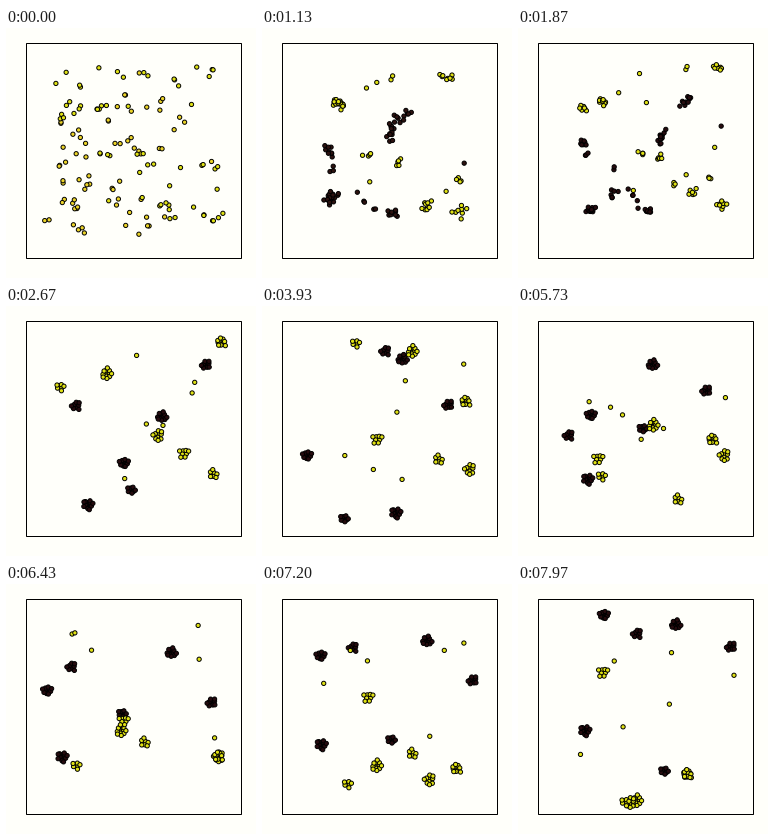
Animation of 250 by 250 pixels, one loop 8 s. Source, as a matplotlib script:

```python
import numpy as np
import matplotlib.pyplot as plt
from matplotlib.animation import FuncAnimation
from matplotlib.patches import Rectangle

SIZE, FRAMES, LOOP = 250, 240, 8000
KEYS = np.array([0, 34, 80, 118, 151, 193, 239])
SPOTS, STRAYS = 90, 6
LOW, HIGH = np.array([23, 18]), np.array([232, 227])
DARK = np.array([38, 11, 14]) / 255
GOLD = np.array([236, 212, 40]) / 255
LIME = np.array([224, 226, 20]) / 255
rng = np.random.default_rng(5)

# Waypoints of each flock, largest flock first.
DARK_ROUTES = [
    [(82, 199), (134, 207), (88, 176), (56, 173), (67, 147)],
    [(156, 111), (140, 53), (111, 49), (166, 69), (158, 41)],
    [(118, 157), (45, 149), (97, 111), (41, 106), (86, 31)],
    [(200, 59), (186, 99), (175, 57), (206, 119), (213, 63)],
    [(70, 100), (123, 46), (50, 155), (66, 82), (119, 50)],
    [(125, 184), (82, 212), (128, 130), (116, 130), (146, 187)],
]
LIME_ROUTES = [
    [(101, 68), (151, 46), (153, 94), (115, 148), (119, 217)],
    [(152, 129), (208, 163), (196, 135), (212, 173), (112, 218)],
    [(215, 36), (203, 96), (179, 100), (212, 173), (169, 190)],
    [(178, 147), (114, 133), (53, 160), (118, 136), (85, 88)],
    [(207, 168), (176, 154), (180, 218), (138, 158), (169, 190)],
    [(54, 81), (94, 38), (97, 149), (70, 182), (107, 218)],
]


def disc(n, spread):
    """Evenly packed offsets in a slightly uneven disc."""
    k = np.arange(n) + 0.5
    a = 2.39996 * k + rng.uniform(0, 2 * np.pi)
    pts = spread * np.sqrt(k)[:, None] * np.c_[np.cos(a), np.sin(a)]
    return pts + rng.normal(0, 0.4, (n, 2))


def flocks(routes, largest, spread):
    paths = [np.array(route, float)[:, None] + disc(largest - i, spread)
             for i, route in enumerate(routes)]
    return np.concatenate(paths, axis=1)


def match(src, dst):
    """Reorder src by swaps so that each point lies close to its dst."""
    cost = ((src[:, None] - dst[None]) ** 2).sum(-1)
    idx = np.arange(len(src))
    order = idx.copy()
    for _ in range(20):
        for i in idx:
            gain = (cost[order[i], i] + cost[order, idx]
                    - cost[order, i] - cost[order[i], idx])
            j = gain.argmax()
            order[i], order[j] = order[j], order[i]
    return src[order]


def gather(pts, radius=15, rounds=4):
    """Draw points of one kind towards their neighbours."""
    for _ in range(rounds):
        d2 = ((pts[:, None] - pts[None]) ** 2).sum(-1)
        w = np.exp(-d2 / (2 * radius**2))
        pts = w @ pts / w.sum(1, keepdims=True)
    return pts + rng.normal(0, 3.2, pts.shape)


def build():
    dark = flocks(DARK_ROUTES, 14, 1.4)
    lime = flocks(LIME_ROUTES, 12, 1.6)
    strays = rng.uniform((60, 40), (220, 180), (dark.shape[0], STRAYS, 2))
    late = np.concatenate([dark, lime, strays], axis=1)
    total, n = late.shape[1], dark.shape[1]

    spots = rng.uniform((42, 38), (213, 207), (SPOTS, 2))
    near = spots[:total - SPOTS] + rng.normal(0, 3, (total - SPOTS, 2))
    start = match(np.vstack([spots, near]), late[0])
    early = np.vstack([gather(start[:n]), gather(start[n:])])
    return np.concatenate([[start, early], late]), n


path, n_dark = build()
slope = 0.7 * np.gradient(path, KEYS, axis=0)


def positions(f):
    """Smooth cubic path through the key positions."""
    k = min(np.searchsorted(KEYS, f, side="right") - 1, len(KEYS) - 2)
    h = KEYS[k + 1] - KEYS[k]
    u = (f - KEYS[k]) / h
    ease = u * u * (3 - 2 * u)
    p = path[k] + ease * (path[k + 1] - path[k])
    p += h * u * (1 - u) * ((1 - u) * slope[k] - u * slope[k + 1])
    return np.clip(p, LOW, HIGH)


fig = plt.figure(figsize=(2.5, 2.5), dpi=100, facecolor="#fffffa")
ax = fig.add_axes([0, 0, 1, 1])
ax.set(xlim=(0, SIZE), ylim=(SIZE, 0))
ax.axis("off")
ax.add_patch(Rectangle((20, 15), 215, 215, fill=False, ec="black", lw=0.72))
dots = ax.scatter(*path[0].T, s=9.4, lw=0.7, edgecolors="black", zorder=3)
colors = np.tile(LIME, (path.shape[1], 1))


def draw(f):
    colors[:n_dark] = DARK + np.exp(-f / 10) * (GOLD - DARK)
    dots.set_offsets(positions(f))
    dots.set_facecolor(colors)
    return (dots,)


anim = FuncAnimation(fig, draw, frames=FRAMES, interval=LOOP / FRAMES,
                     repeat=True, repeat_delay=0)
plt.show()
```
